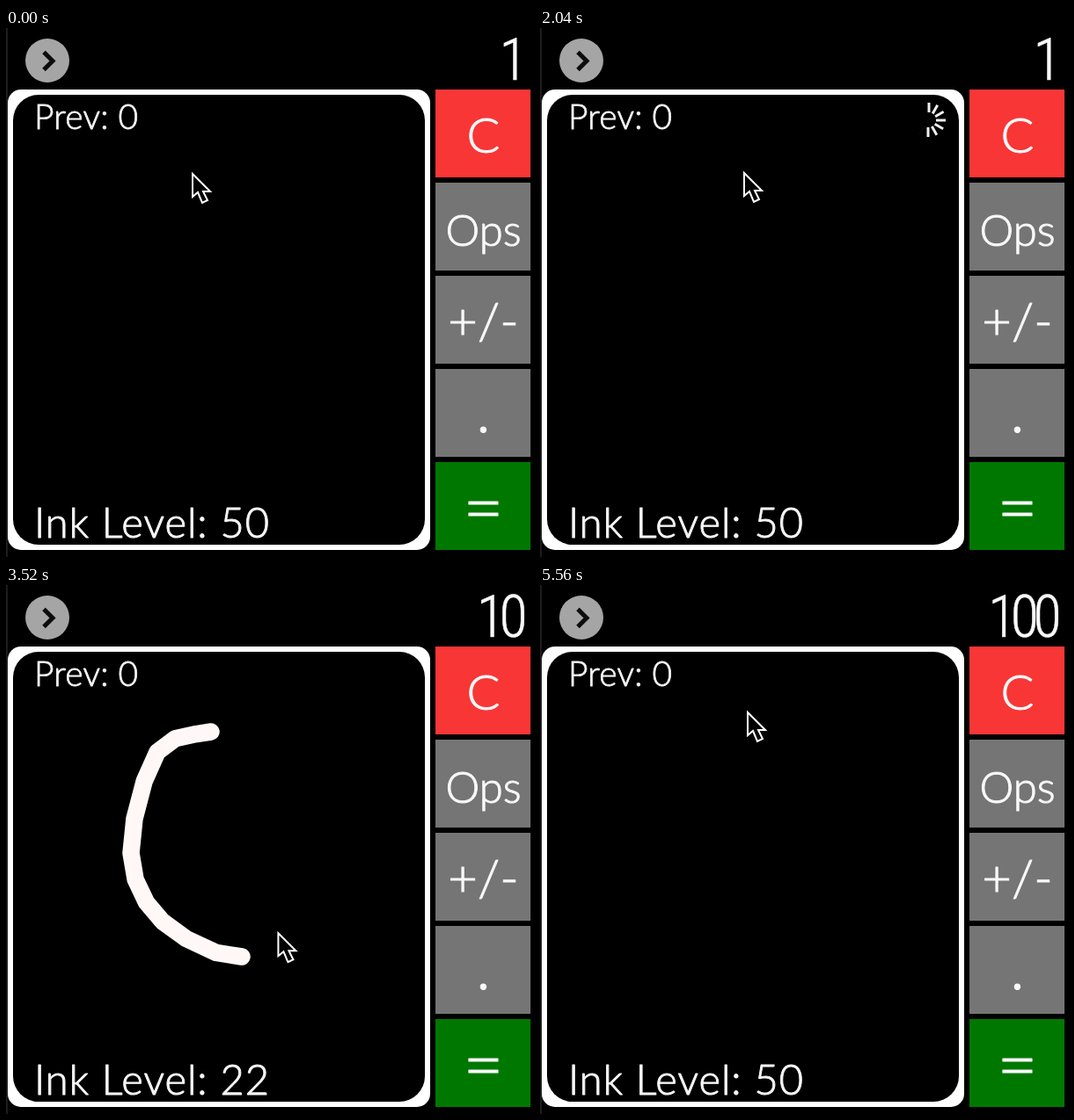
Animation of 600x602 px, one loop 6.4 s. Source, as an HTML page:

```html
<!DOCTYPE html>
<html lang="en">
<head>
<meta charset="utf-8">
<title>Handwriting calculator</title>
<style>
  html, body { margin: 0; width: 100%; height: 100%; overflow: hidden; background: #000; }
  svg { display: block; width: 100vw; height: 100vh; }
  text { font: 300 48px Lato, sans-serif; fill: #f8f8f8; stroke: #f8f8f8; stroke-linejoin: round; }
  .key text { text-anchor: middle; }
  .key rect { fill: #757575; }
  .key:first-child rect { fill: #f83636; }
  .key:last-child rect { fill: #007800; }
  #total {
    font: 300 66px "Roboto Condensed", Roboto, sans-serif;
    font-stretch: 75%; letter-spacing: -6.5px; text-anchor: end; stroke-width: .6;
  }
  #ink { font-size: 47px; letter-spacing: 1px; }
  #prev { font-size: 39px; letter-spacing: .2px; stroke-width: .8; }
  #stroke { fill: none; stroke: #fff8f6; stroke-width: 19.5; stroke-linecap: round; stroke-linejoin: round; }
</style>
</head>
<body>
<svg viewBox="0 0 600 602">
  <rect width="600" height="602"/>
  <path d="M1 0V602" stroke="#1c1c1c" stroke-width="2"/>
  <circle cx="47" cy="37" r="25" fill="#a5a5a5"/>
  <path d="M43 27.500L53 37.500L43 47.500" fill="none" stroke="#0c0c0c" stroke-width="5"/>
  <rect x="2" y="70" width="480" height="524" rx="15" fill="#fff"/>
  <rect x="8" y="76" width="468" height="512" rx="29"/>
  <g id="keys"></g>
  <text id="prev" x="32" y="115">Prev: 0</text>
  <text id="ink" x="32" y="580"></text>
  <text id="total" x="586" y="59"></text>
  <g id="spinner" stroke="#eee" stroke-width="3"></g>
  <polyline id="stroke"/>
  <path id="cursor" d="M1 2V28L7 23L12 35L18 32L13 22H21Z" stroke="#fff" stroke-width="2"/>
</svg>
<script>
const $ = id => document.getElementById(id);
const clamp = (v, lo, hi) => Math.min(hi, Math.max(lo, v));
const STEP = 40, LOOP = 6400, TICKS = 12;
const KEY_GAP = 3; // steps between two key points of a pen path

const keySizes = { 'C': 56, 'Ops': 49, '+/-': 58, '.': 70, '=': 80 };
$('keys').innerHTML = Object.entries(keySizes).map(([label, size], i) => {
  const top = 70 + 106 * i;
  const baseline = top + (label === '=' ? 81 : 72);
  return `<g class="key"><rect x="488" y="${top}" width="108" height="100"/>
    <text x="542.500" y="${baseline}" style="font-size:${size}px">${label}</text></g>`;
}).join('');

$('spinner').innerHTML = Array.from({ length: TICKS }, (_, i) =>
  `<path d="M442 85V96" transform="rotate(${360 / TICKS * i} 441.500 104.500)"/>`).join('');
const ticks = [...$('spinner').children];

const zeros = [
  { start: 40, clear: 1480, done: 2560, rest: [231, 163], path: [
    [211, 167], [271, 194], [297, 300], [291, 384], [234, 417],
    [185, 407], [145, 340], [155, 240], [210, 174], [238, 178]] },
  { start: 2960, clear: 4440, done: 5560, rest: [235, 143], path: [
    [233, 167], [172, 190], [142, 305], [178, 383], [268, 423],
    [321, 365], [324, 182], [275, 146], [242, 144], [231, 146]] },
];

// Catmull-Rom curve through the key points
function penAt(path, step) {
  const s = clamp(step / KEY_GAP, 0, path.length - 1);
  const i = Math.floor(s), u = s - i;
  const key = n => path[clamp(n, 0, path.length - 1)];
  const [a, b, c, d] = [-1, 0, 1, 2].map(n => key(i + n));
  return [0, 1].map(k => b[k] + u / 2 * (c[k] - a[k]
    + u * (2 * a[k] - 5 * b[k] + 4 * c[k] - d[k]
    + u * (3 * (b[k] - c[k]) + d[k] - a[k]))));
}

function draw(now) {
  const t = Math.floor(now % LOOP / STEP) * STEP;
  const { start, clear, done, rest, path } = zeros[t < zeros[1].start ? 0 : 1];
  const writing = t < clear;
  const step = Math.min((t - start) / STEP, 25);

  // The ink trails the cursor by two steps.
  const drawn = writing && step > 2 ? step - 1 : 0;
  const line = Array.from({ length: drawn }, (_, n) => penAt(path, n));
  $('stroke').setAttribute('points', line.join(' '));

  const used = writing ? clamp(Math.floor(2.13 * step - 1.5), 0, 50) : 0;
  $('ink').textContent = 'Ink Level: ' + (50 - used);
  $('total').textContent = 10 ** zeros.filter(z => t >= z.done).length;

  const [px, py] = penAt(path, step);
  const move = clamp((t - clear) / 400, 0, 1);
  const x = px + (rest[0] - px) * move;
  const y = py - 3 + (rest[1] - py + 3) * move;
  $('cursor').setAttribute('transform', `translate(${x} ${y})`);

  const progress = (t - clear) / (done - clear);
  const loading = !writing && t < done;
  ticks.forEach((tick, i) =>
    tick.setAttribute('opacity', loading ? clamp(progress * TICKS - i + .8, 0, 1) : 0));
}

function frame() {
  draw(performance.now());
  requestAnimationFrame(frame);
}
frame();
</script>
</body>
</html>
```
